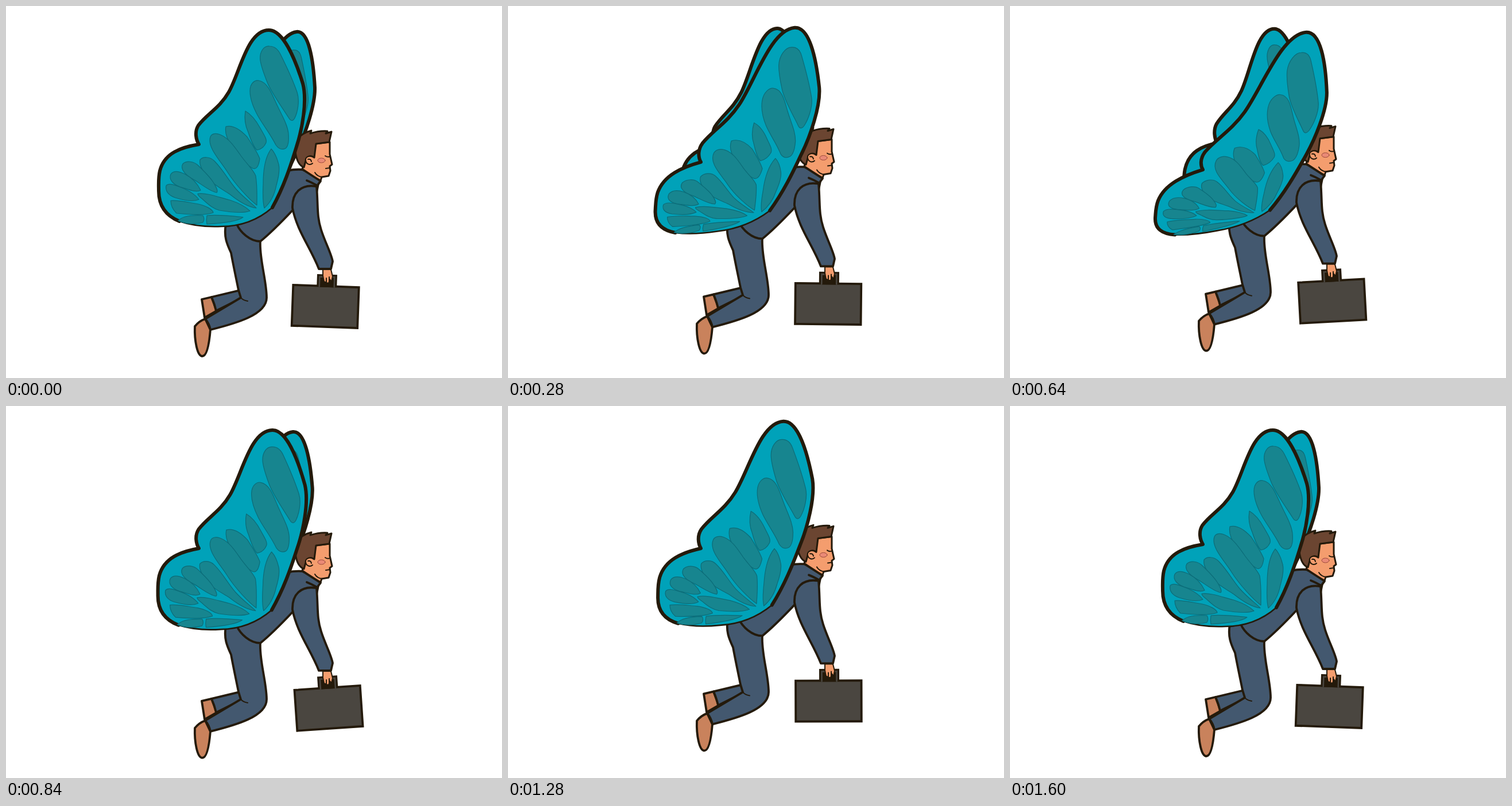
An HTML page for the animation above (1.64 s loop, 864x648 px).

```html
<!DOCTYPE html>
<html>
<head>
<meta charset="utf-8">
<style>
  html, body { margin: 0; width: 100%; height: 100%; overflow: hidden; background: #fff; }
  svg { display: block; width: 100vw; height: 100vh; }
  svg { --ink: #241a0b; --teal: #00a2b9; --suit: #43586f; --skin: #f49d6e; --shoe: #c9825c; }
  #figure { stroke: var(--ink); stroke-width: 3.8; stroke-linejoin: round; stroke-linecap: round; fill: none; }
  .suit { fill: var(--suit); }
  .skin { fill: var(--skin); }
  .shoe { fill: var(--shoe); }
  .hair { fill: #6b4531; }
  .case { fill: #4a4640; stroke-linejoin: miter; }
  .thin { stroke-width: 2; }
  .fill { fill: var(--teal); stroke-width: 2.6; }
  .edge { stroke-width: 6; }
  .spot { fill: #17858f; stroke: #0c6c78; stroke-width: 1.2; }
</style>
</head>
<body>
<svg viewBox="0 0 864 648">
  <g id="figure">
    <g id="farWing"></g>

    <!-- legs -->
    <path class="shoe" d="M341,511 L358,507 L367,531 L346,543 Z"/>
    <path class="suit" d="M358,507 L408,495 L412,508 L366,531 Q363,518 358,507 Z"/>
    <path class="shoe" d="M347,545 L356,564 C354,588 350,610 342,610 C333,610 328,582 329,558 Q336,549 347,545 Z"/>
    <path class="suit" d="M383,380 C379,402 385,415 392,430 C396,452 401,475 405,495 L409,508 L347,545 Q354,553 356,564
      C400,553 454,538 454,508 C454,478 441,440 443,410 L420,370 Z"/>
    <path class="thin" d="M409,508 Q413,513 421,514"/>

    <!-- neck and head -->
    <path class="skin" stroke-width="3" d="M540,240 L564,237 L564,258 L568,276 L564,279 L565,287 L562,296 L550,298 L548,304 L515,288 L519,272 L524,258 Z"/>
    <path class="hair" stroke-width="3" d="M507,232 Q516,221 532,217 L530,222 Q546,217 560,218 L557,222 L567,219 L563,237 L540,240 L537,264
      C531,259 522,262 522,270 L519,281 C506,276 500,252 507,232 Z"/>
    <path class="skin thin" d="M536,264 C529,259 521,263 522,269 C523,276 530,278 534,274"/>
    <path class="thin" d="M526,267 Q531,266 532,271 M538,290 Q542,297 551,298 M556,261 Q560,264 565,262 M557,283 L564,282"/>
    <ellipse cx="549.500" cy="269" rx="6.500" ry="4" fill="#ea8a76" stroke="#9c4a3c" stroke-width="1"/>

    <!-- jacket -->
    <path class="suit" d="M382,384 C420,350 460,300 490,287 Q502,284 517,285 L545,305 L541,325 L500,355
      C482,374 458,398 443,410 C425,410 408,394 402,380 Z"/>
    <path class="suit" d="M540,314 C514,310 498,325 499,352 C507,392 530,420 545,458 L566,458 L569,445
      C567,432 556,412 549,390 C541,365 544,350 541,314 Z"/>
    <path d="M517,285 L548,305 L542,313 Q532,307 524,304" class="suit"/>

    <g id="briefcase">
      <path class="case" d="M501,488 H615.500 V559 H501 Z"/>
      <path d="M547,473 H572 V488 H547 Z" fill="#241a0b"/>
      <path d="M546.500,489 V472 H572.500 V489" stroke-width="9" stroke-linejoin="miter" stroke-linecap="butt"/>
      <path d="M546.500,489 V472 H572.500 V489" stroke="#4a4640" stroke-width="2.500" stroke-linejoin="miter"/>
    </g>
    <path class="skin" stroke-width="2" d="M552,459 L566,459 L569,471 L567,480 L564,476 L562,483 L558,482 L554,480 L552,470 Z"/>
    <path class="thin" d="M558,474 V481 M563,472 V479"/>

    <g id="nearWing"></g>
  </g>
</svg>
<script>
const LOOP = 1640, STEP = 40, FLAP = 400;

const edge = 'M302,375 C280,366 266,350 266,322 C266,312 265,300 268,287 C276,256 305,246 336,241 C331,233 328,219 335,208 ' +
  'C350,188 372,178 388,150 C408,115 420,42 458,42 C482,42 503,90 517,135 C525,165 516,215 506,245 C496,278 484,315 464,351';
const hem = ' C440,372 410,384 375,384 C350,385 322,382 302,375 Z';
const spots = [
  'M443,95 C441,80 449,69 459,70 C468,70 474,76 478,84 C490,108 500,130 507,150 C512,165 508,185 503,195 C500,201 496,201 492,194 C480,175 465,155 456,135 C450,120 445,108 443,95Z',
  'M425,148 C425,134 434,128 441,130 C455,133 462,150 470,168 C480,190 490,205 492,222 C493,235 491,245 487,248 C481,251 475,249 470,242 C460,222 448,208 438,190 C430,175 425,160 425,148Z',
  'M417,183 C415,195 416,207 422,220 C427,235 431,245 437,251 C444,250 450,245 453,238 C455,232 449,224 443,213 C436,200 426,188 417,183Z',
  'M383,210 C381,220 385,232 393,243 C403,258 415,275 430,283 C436,285 440,280 442,266 C438,255 428,240 420,228 C408,215 395,207 383,210Z',
  'M356,228 C358,222 366,221 373,224 C388,230 398,245 410,262 C422,278 432,287 435,296 C438,315 437,335 437,347 C425,338 400,312 385,288 C372,268 350,245 356,228Z',
  'M462,249 C452,262 448,285 448,310 C447,330 448,345 450,352 C460,343 468,328 471,312 C475,298 477,285 475,276 C472,264 468,255 462,249Z',
  'M338,268 C343,262 355,262 363,270 C378,285 385,300 400,318 C415,335 430,345 436,352 C420,350 405,340 390,328 C375,318 362,312 353,300 C344,290 336,278 338,268Z',
  'M308,275 C314,269 327,270 335,278 C345,288 355,297 361,307 C366,315 370,322 367,325 C355,323 340,310 328,303 C315,296 302,285 308,275Z',
  'M287,293 C292,286 302,288 312,293 C325,300 334,310 339,321 C330,326 315,318 303,315 C292,311 283,303 287,293Z',
  'M279,313 C283,308 292,311 302,315 C313,319 327,325 336,337 C325,342 308,338 295,334 C283,330 277,322 279,313Z',
  'M334,327 C350,325 370,333 390,338 C405,343 418,350 425,357 C412,362 390,359 372,356 C360,353 352,345 344,338 C340,334 334,331 334,327Z',
  'M287,339 C305,338 320,343 335,345 C348,348 360,354 361,360 C345,366 315,363 297,361 C290,354 287,347 287,339Z',
  'M300,374 C307,366 325,364 343,365 C346,370 345,374 343,377 C330,381 312,380 300,374Z',
  'M350,365 C370,363 395,366 413,368 C405,374 385,378 350,380 C349,375 349,370 350,365Z'
];
const layers = [['fill', edge + hem], ['edge', edge], ...spots.map(d => ['spot', d])];

const byId = id => document.getElementById(id);

function makeWing(id) {
  const paths = layers.map(([name, d]) => {
    const path = document.createElementNS('http://www.w3.org/2000/svg', 'path');
    path.setAttribute('class', name);
    byId(id).append(path);
    return { path, d };
  });
  return warp => paths.forEach(({ path, d }) =>
    path.setAttribute('d', d.replace(/(\d+),(\d+)/g, (_, x, y) => warp(+x, +y).map(n => n.toFixed(1)).join())));
}

// Swings a wing point from raised (k = 0) to spread (k = 1).
function swing(x, y, k) {
  const v = 351 - y, u = 440 - x;
  const dx = -11 + 0.12 * v + 0.0003 * v * v - 0.0004 * u * v - 0.00012 * u * u;
  const dy = 17 + 0.28 * v - 0.00092 * v * v + 0.14 * u + 0.0002 * u * u;
  return [x + k * dx, y + k * dy - 0.148 * k * (1 - k) * v];
}

// The far wing is narrower, swings the opposite way and foreshortens when it spreads.
function swingFar(x, y, k) {
  const spread = 1 - k;
  const farK = 0.8 * Math.sign(spread) * Math.abs(spread) ** 1.3;
  return swing(458 + 0.82 * (x - 455), 41 + (y - 41) * (1 - 0.08 * spread) + 7 * k, farK);
}

// Eases between [time, value] keys with half cosines.
function ease(keys, t) {
  const i = Math.max(1, keys.findIndex(key => key[0] >= t));
  const [t0, a] = keys[i - 1], [t1, b] = keys[i];
  return a + (b - a) * (1 - Math.cos(Math.PI * (t - t0) / (t1 - t0))) / 2;
}

const bob = [[0, 0], [180, -6.2], [535, 2.8], [655, -9.8], [930, 7], [1280, -9.6], [1600, 0]];
const tilt = [[0, 2.1], [840, -3.9], [1600, 2.1]];
const drawNear = makeWing('nearWing'), drawFar = makeWing('farWing');

function draw(now) {
  const t = Math.floor(now % LOOP / STEP) * STEP;
  const k = 0.553 * (1 - Math.cos(2 * Math.PI * t / FLAP));
  drawNear((x, y) => swing(x, y, k));
  drawFar((x, y) => swingFar(x, y, k));
  byId('figure').setAttribute('transform', `translate(0 ${ease(bob, t)})`);
  byId('briefcase').setAttribute('transform', `rotate(${ease(tilt, t)} 559 468)`);
}

const start = performance.now();
function tick() {
  draw(performance.now() - start);
  requestAnimationFrame(tick);
}
tick();
</script>
</body>
</html>
```
